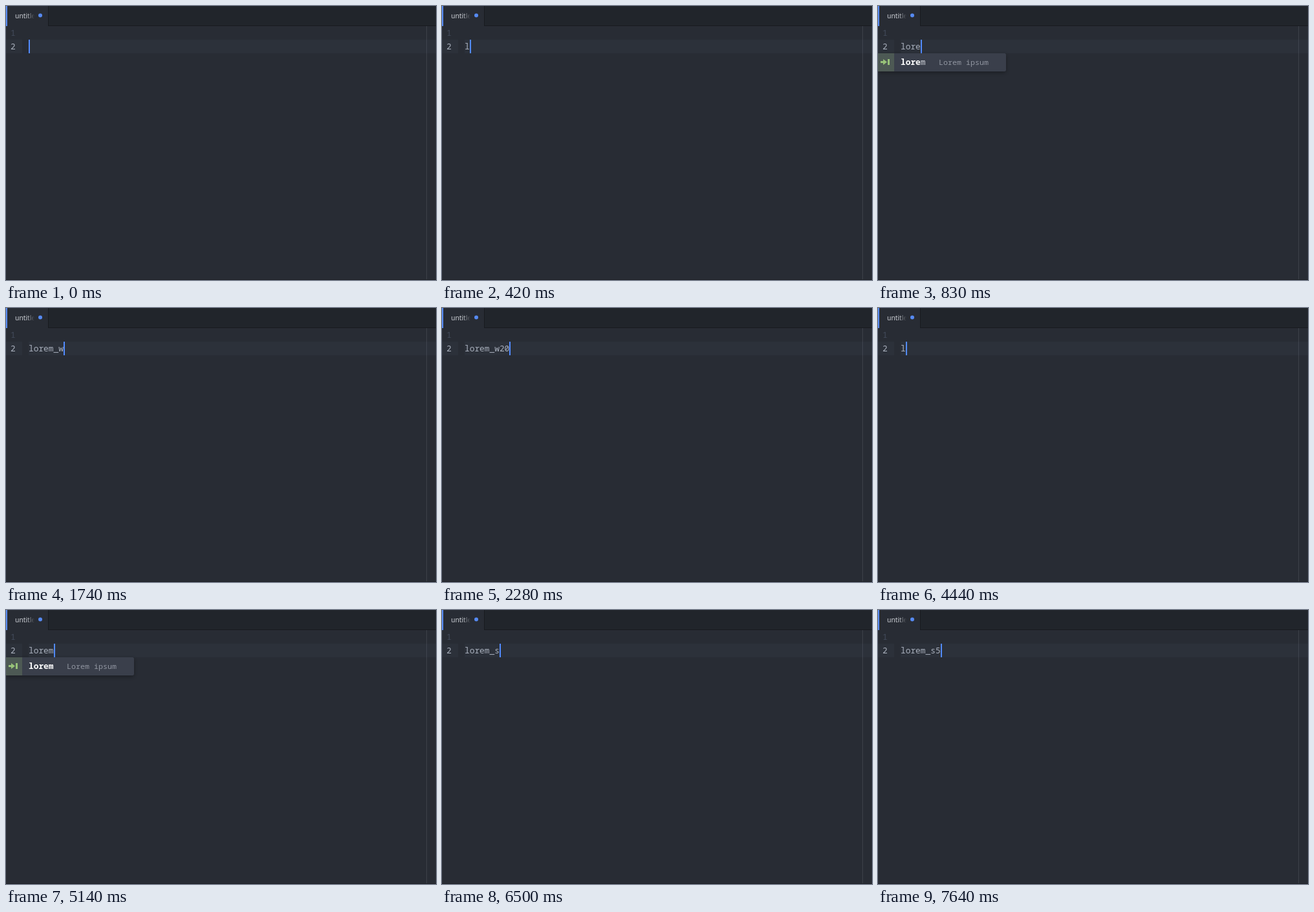
These frames come from a looping animation (665x423 px, 8000 ms). An HTML page with a canvas:

```html
<!DOCTYPE html>
<html lang="en">
<head>
<meta charset="utf-8">
<title>Snippet editor</title>
<style>
html, body { margin: 0; width: 100%; height: 100%; overflow: hidden; background: #282c34; }
canvas { display: block; }
</style>
</head>
<body>
<canvas id="stage" width="665" height="423"></canvas>
<script>
const ctx = document.getElementById('stage').getContext('2d');
const W = 665, H = 423, LOOP = 8000;
const CELL = 7.7, LEFT = 35, TOP = 31, ROW = 21;
const mono = (advance, weight = 'normal') =>
  `${weight} ${advance / 0.6}px "Noto Sans Mono", monospace`;

const PARAGRAPH = [
  'eram quem cillum aute magna sunt quem dolore aliqua malis cillum irure quem esse',
  'nisi quis dolore anim esse nulla'
];
const KNOWN_WORDS = ['magna', 'nisi'];
const SUGGESTIONS = [['lorem', 'Lorem ipsum'], ['link', 'Markdown link']];

// Each step merges its changes into the editor state.
const STEPS = [
  [0, { text: '', cursor: true, popup: 0, matched: 0, marked: false, expanded: false }],
  [300, { text: 'l' }],
  [430, { popup: 2, matched: 1 }],
  [550, { text: 'lo', popup: 1, matched: 2 }],
  [700, { text: 'lor', matched: 3 }],
  [830, { text: 'lore', matched: 4 }],
  [980, { text: 'lorem', matched: 5 }],
  [1370, { text: 'lorem_' }],
  [1740, { text: 'lorem_w', popup: 0 }],
  [2010, { marked: true }],
  [2160, { text: 'lorem_w2', marked: false }],
  [2280, { text: 'lorem_w20' }],
  [2800, { expanded: true, cursor: false }],
  [3070, { marked: true }],
  [4440, { text: 'l', expanded: false, marked: false, cursor: true }],
  [4570, { popup: 2, matched: 1 }],
  [4720, { text: 'lo', popup: 1, matched: 2 }],
  [4870, { text: 'lore', matched: 4 }],
  [5020, { text: 'lorem' }],
  [5140, { matched: 5 }],
  [5580, { cursor: false }],
  [5730, { text: 'lorem_', cursor: true }],
  [6190, { cursor: false }],
  [6500, { text: 'lorem_s', popup: 0, cursor: true }],
  [6660, { marked: true }],
  [6970, { cursor: false }],
  [7270, { cursor: true }],
  [7640, { text: 'lorem_s5', marked: false }]
];

function stateAt(time) {
  const past = STEPS.filter(([start]) => start <= time).map(step => step[1]);
  return Object.assign({}, ...past);
}

function rect(x, y, w, h, color) {
  ctx.fillStyle = color;
  ctx.fillRect(x, y, w, h);
}

function label(text, x, y, color, font = mono(CELL)) {
  ctx.font = font;
  ctx.fillStyle = color;
  ctx.fillText(text, x, y);
}

const rowTop = row => TOP + row * ROW;
const columnX = column => Math.round(LEFT + column * CELL);

function drawTabs() {
  rect(0, 0, W, 30, '#21252b');
  rect(0, 30, W, 1, '#181a1f');
  rect(0, 0, 65, 31, '#282c34');
  rect(65, 0, 1, 31, '#181a1f');
  rect(0, 0, 2, 31, '#568af2');
  const fade = ctx.createLinearGradient(32, 0, 44, 0);
  fade.addColorStop(0, '#d7dae0');
  fade.addColorStop(1, 'rgba(215,218,224,0)');
  label('untitled', 14, 19, fade, '10.4px "Open Sans", sans-serif');
  ctx.fillStyle = '#568af2';
  ctx.beginPath();
  ctx.arc(53, 14.5, 3, 0, Math.PI * 2);
  ctx.fill();
}

function drawMarks(text, row) {
  for (const word of text.matchAll(/\S+/g)) {
    if (KNOWN_WORDS.includes(word[0])) continue;
    const end = columnX(word.index + word[0].length);
    for (let x = columnX(word.index); x < end; x += 4) {
      rect(x, rowTop(row) + 19, Math.min(2, end - x), 2, '#c4383e');
    }
  }
}

function drawEditor(state) {
  const lines = state.expanded ? PARAGRAPH : [state.text];
  lines.forEach((text, i) => {
    const y = rowTop(i + 1);
    rect(0, y, 25, ROW, '#2c313a');
    if (!state.expanded) rect(LEFT, y, W - LEFT, ROW, '#2c313a');
    else rect(LEFT, y, (i ? columnX(text.length) : W) - LEFT, ROW, '#3e4451');
  });
  rect(650, TOP, 1, H - TOP, 'rgba(171,178,191,0.15)');
  label('1', 7, TOP + 15, '#434b5b');
  lines.forEach((text, i) => {
    const y = rowTop(i + 1) + 15;
    label(i + 2, 7, y, '#abb2bf');
    label(text, LEFT, y, '#abb2bf');
    if (state.marked) drawMarks(text, i + 1);
  });
  if (state.cursor) rect(columnX(state.text.length), rowTop(1), 2, ROW, '#528bff');
}

function drawSnippetIcon(y) {
  rect(0, y, 25, 28, '#4d5954');
  rect(4, y + 12, 5, 3, '#98c379');
  ctx.beginPath();
  ctx.moveTo(8, y + 9);
  ctx.lineTo(14, y + 13.5);
  ctx.lineTo(8, y + 18);
  ctx.fill();
  rect(15, y + 9, 3, 9, '#98c379');
}

function drawPopup({ popup, matched }) {
  if (!popup) return;
  const top = 73, width = popup > 1 ? 215 : 198;
  ctx.save();
  ctx.beginPath();
  ctx.roundRect(0, top, width, popup * 28, [0, 3, 3, 0]);
  ctx.shadowColor = 'rgba(0,0,0,0.35)';
  ctx.shadowBlur = 6;
  ctx.shadowOffsetY = 2;
  ctx.fillStyle = '#353b45';
  ctx.fill();
  ctx.shadowColor = 'transparent';
  ctx.clip();
  SUGGESTIONS.slice(0, popup).forEach(([word, note], i) => {
    const y = top + i * 28;
    if (i === 0) rect(0, y, width, 28, '#3a3f4b');
    drawSnippetIcon(y);
    label(word.slice(0, matched), LEFT, y + 18, '#ffffff', mono(CELL, 'bold'));
    label(word.slice(matched), LEFT + matched * CELL, y + 18, '#d7dae0');
    label(note, 94, y + 18, '#9196a1', mono(7));
  });
  ctx.restore();
}

function draw(now) {
  const state = stateAt(now % LOOP);
  rect(0, 0, W, H, '#282c34');
  drawTabs();
  drawEditor(state);
  rect(0, 422, W, 1, '#1e2127');
  drawPopup(state);
}

const start = performance.now();
function tick() {
  draw(performance.now() - start);
  requestAnimationFrame(tick);
}
tick();
</script>
</body>
</html>
```
